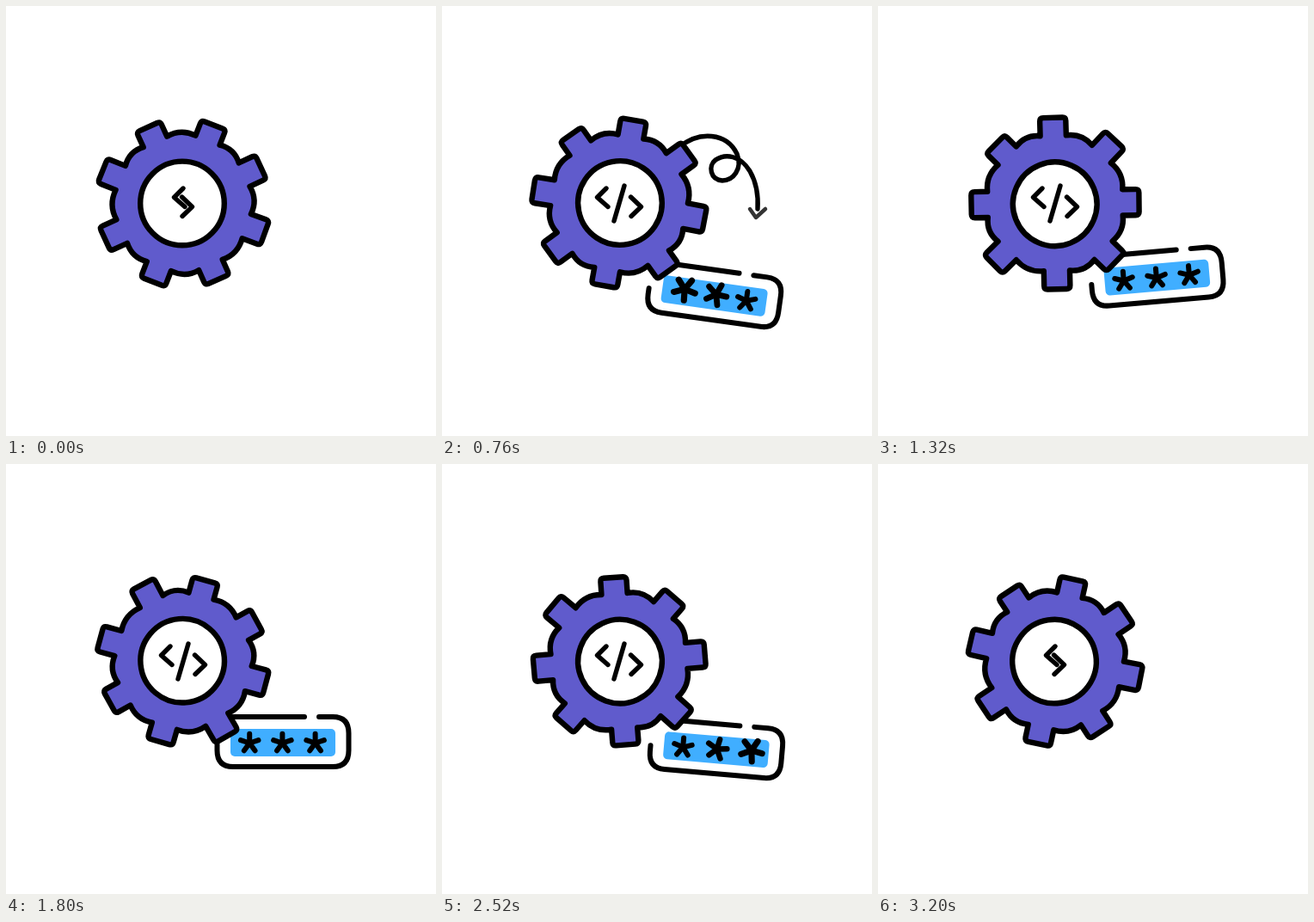
Animation, 500 px wide and 500 px high, one loop 3.24 s. Source, as an HTML page with a canvas:

```html
<!DOCTYPE html>
<html lang="en">
<head>
<meta charset="utf-8">
<title>Gear and code</title>
<style>
html, body { margin: 0; width: 100%; height: 100%; overflow: hidden; background: #fff; }
canvas { display: block; width: 500px; height: 500px; }
</style>
</head>
<body>
<canvas id="stage" width="500" height="500"></canvas>
<script>
const ctx = document.getElementById('stage').getContext('2d');
const LOOP = 3240, STEP = 40;
const PURPLE = '#605bcc', BLUE = '#40aeff', RAD = Math.PI / 180;

const clamp = v => Math.min(1, Math.max(0, v));
const ramp = (t, a, b) => clamp((t - a) / (b - a));
const smooth = v => v * v * (3 - 2 * v);
const easeOut = v => 1 - (1 - v) * (1 - v);
const bump = (t, a, b) => Math.sin(Math.PI * ramp(t, a, b));

// Rises to 1 between a and b, falls back to 0 between c and d
const span = (t, a, b, c, d) => smooth(ramp(t, a, b)) * (1 - smooth(ramp(t, c, d)));

// Tooth angle (degrees from the top) and tip radius
const teeth = [
  [-24.5, 97.5], [21.3, 97.5], [65, 99.5], [110, 101],
  [156, 97.5], [201, 98], [245.3, 100], [292, 101]
];

function polar(deg, r) {
  return [Math.sin(deg * RAD) * r, -Math.cos(deg * RAD) * r];
}

// Point on a tooth: sideways offset x, distance y from the centre
function onTooth(deg, x, y) {
  const s = Math.sin(deg * RAD), c = Math.cos(deg * RAD);
  return [x * c + y * s, x * s - y * c];
}

function makeGear() {
  const p = new Path2D(), half = 15.1, root = 78.5;
  teeth.forEach(([deg, tip], i) => {
    const at = (x, y) => onTooth(deg, x, y);
    if (i === 0) p.moveTo(...at(-half, root));
    p.lineTo(...at(-half, tip - 4));
    p.quadraticCurveTo(...at(-half, tip), ...at(-half + 4, tip));
    p.lineTo(...at(half - 4, tip));
    p.quadraticCurveTo(...at(half, tip), ...at(half, tip - 4));
    p.lineTo(...at(half, root));
    const next = teeth[(i + 1) % teeth.length][0] + (i === teeth.length - 1 ? 360 : 0);
    p.quadraticCurveTo(...polar((deg + next) / 2, 87), ...onTooth(next, -half, root));
  });
  p.closePath();
  return p;
}

const gear = makeGear();
const arrow = new Path2D('M276 164C299 145 331 147 343 172C350 190 338 203 326 203' +
  'C312 202 309 186 318 179C330 171 347 174 358 192C366 206 368 220 367 236');
const arrowHead = new Path2D('M358 236L365 246L376 236');
const frameMain = new Path2D('M364 294H380Q398.5 294 398.5 313V333Q398.5 352 380 352' +
  'H264Q245.5 352 245.5 333V321');
const frameTop = new Path2D('M347 294H264');

function stroke(path, width) {
  ctx.lineWidth = width;
  ctx.stroke(path);
}

// Strokes the part of a path between two fractions of its length
function trim(path, length, from, to, width) {
  if (to - from < 0.002) return;
  ctx.save();
  ctx.setLineDash([(to - from) * length, length * 2]);
  ctx.lineDashOffset = -from * length;
  stroke(path, width);
  ctx.restore();
}

function line(width, ...pts) {
  const p = new Path2D();
  pts.forEach(([x, y]) => p.lineTo(x, y));
  stroke(p, width);
}

function drawArrow(t) {
  const to = smooth(ramp(t, 400, 740));
  const from = smooth(ramp(t, 1000, 1240));
  trim(arrow, 262, from, to, 5.4);
  ctx.globalAlpha = ramp(t, 640, 790) * (1 - ramp(t, 1160, 1260));
  stroke(arrowHead, 4.5);
  ctx.globalAlpha = 1;
}

function drawStar(t, i) {
  const lag = i * 80;
  const size = span(t, 240 + lag, 480 + lag, 2860 + i * 30, 3000 + i * 30);
  if (size < 0.02) return;
  // A wave that swells and turns the stars one after another
  const swell = bump(t, 600 + lag, 920 + lag) + bump(t, 2160 + lag, 2480 + lag);
  const scale = size * (1 + 0.2 * swell);
  ctx.save();
  ctx.translate(283.2 + i * 38.2 + swell * 3.6, 324.5 - swell * 3.4);
  ctx.rotate(swell * 32 * RAD);
  ctx.scale(scale, scale);
  for (let k = 0; k < 5; k++) line(6, [0, 0], polar(k * 72, 10.8));
  ctx.restore();
}

function drawBadge(t) {
  const shown = easeOut(ramp(t, 40, 420)) * (1 - ramp(t, 2860, 3160) ** 2);
  const fill = span(t, 160, 480, 2900, 3100);
  ctx.save();
  ctx.translate(226, 292);
  ctx.rotate(8.4 * RAD * Math.cos(t / 800 * 2 * Math.PI));
  ctx.translate(-226, -292);
  if (fill > 0.01) {
    ctx.fillStyle = BLUE;
    ctx.beginPath();
    ctx.roundRect(261, 308, 122 * fill, 32, 5);
    ctx.fill();
  }
  trim(frameMain, 250, 0, shown, 6);
  trim(frameTop, 83, 0, shown, 6);
  for (let i = 0; i < 3; i++) drawStar(t, i);
  ctx.restore();
}

function drawGear(t) {
  ctx.save();
  ctx.translate(206, 229.3);
  ctx.rotate(t / LOOP * 4 * Math.PI);
  ctx.fillStyle = PURPLE;
  ctx.fill(gear);
  stroke(gear, 6.4);
  ctx.fillStyle = '#fff';
  ctx.beginPath();
  ctx.arc(-1, 0.1, 48.8, 0, 2 * Math.PI);
  ctx.fill();
  ctx.lineWidth = 6.4;
  ctx.stroke();
  ctx.restore();
}

function drawCode(t) {
  const shift = 15 * (1 - span(t, 60, 420, 2940, 3160));
  const slash = span(t, 300, 520, 2860, 3000);
  line(5.4, [191 + shift, 212], [180.5 + shift, 222.5], [193 + shift, 233.5]);
  line(5.4, [219.5 - shift, 222], [231.5 - shift, 233.5], [220 - shift, 244.5]);
  if (slash > 0.01) line(5.4, [212, 209], [212 - 12 * slash, 209 + 41 * slash]);
}

function draw(t) {
  ctx.fillStyle = '#fff';
  ctx.fillRect(0, 0, 500, 500);
  ctx.strokeStyle = '#000';
  ctx.lineCap = ctx.lineJoin = 'round';
  drawArrow(t);
  drawBadge(t);
  drawGear(t);
  drawCode(t);
}

const start = performance.now();
function tick() {
  const t = (performance.now() - start) % LOOP;
  draw(Math.floor(t / STEP) * STEP);
  requestAnimationFrame(tick);
}
tick();
</script>
</body>
</html>
```
